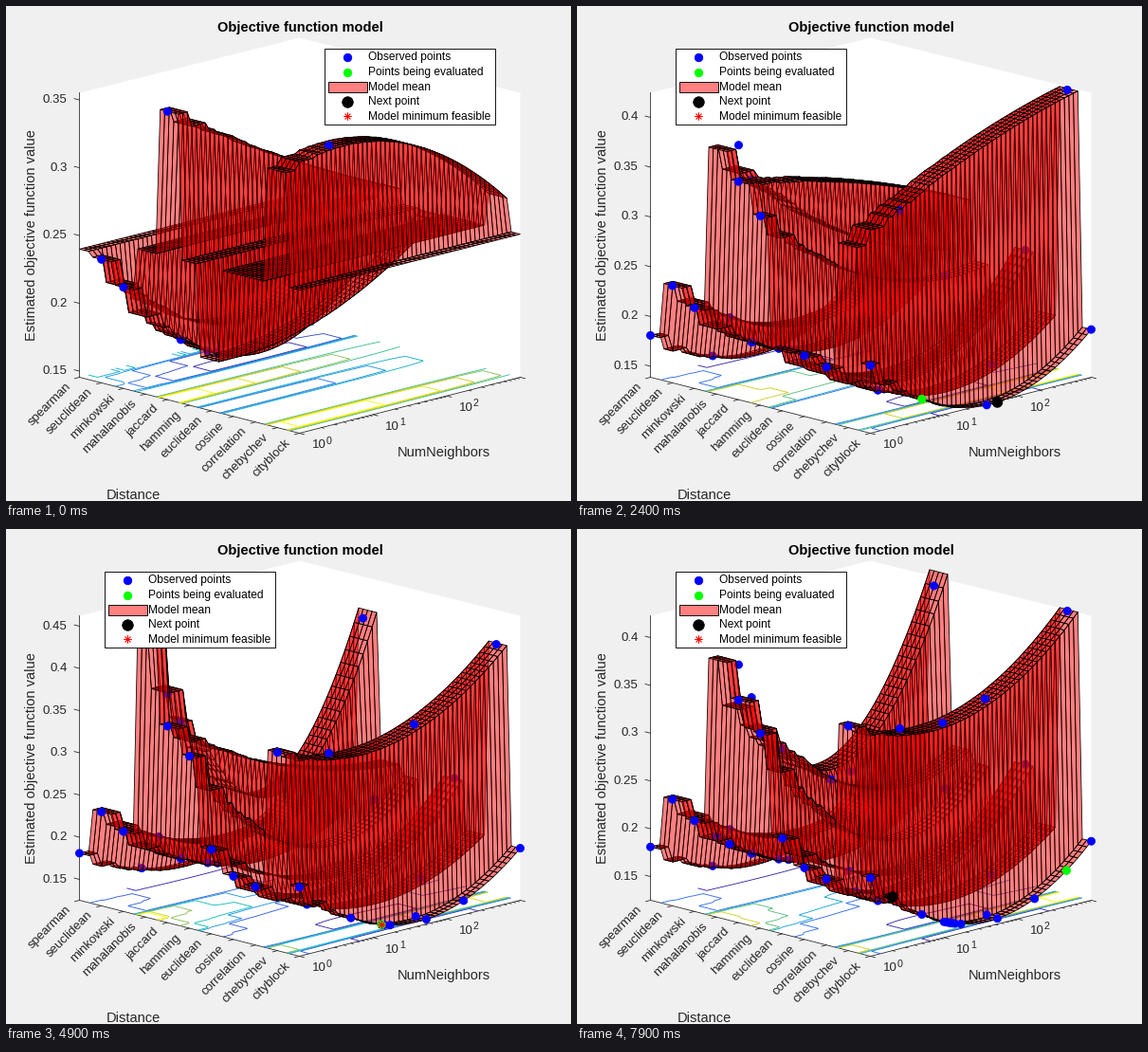
These frames come from a looping animation (596x522 px, 8 s). A matplotlib script:

```python
import numpy as np
import matplotlib.pyplot as plt
from matplotlib.animation import FuncAnimation
from matplotlib.collections import PolyCollection
from matplotlib.colors import LinearSegmentedColormap
from matplotlib.patches import Polygon, Rectangle

W, H, DPI = 596, 522, 128
PX = 72 / DPI
FRAMES, INTERVAL = 80, 100
INK = "#262626"
BLUE, GREEN, BLACK, GLASS = (0, 0, 1, 1), (0, 1, 0, 1), (0, 0, 0, 1), (1, 0, 0, .5)
NAMES = ("spearman seuclidean minkowski mahalanobis jaccard hamming euclidean "
         "cosine correlation chebychev cityblock").split()

plt.rcParams["font.family"] = "Liberation Sans"
parula = LinearSegmentedColormap.from_list(
    "parula", ["#3e26a8", "#2f80fa", "#12beb9", "#c8c129", "#f9fb15"])

# Model stages: mean at the start, middle and end of the neighbor axis.
stage_at, stages, z_low, z_scale = [], [], [], []


def stage(frame, low, scale, **curves):
    model = stages[-1].copy() if stages else np.full((11, 3), .251)
    for name, values in curves.items():
        model[NAMES.index(name)] = values
    stage_at.append(frame)
    stages.append(model)
    z_low.append(low)
    z_scale.append(scale)


stage(0, .1455, 1430, spearman=.24, seuclidean=(.2365, .17, .2),
      minkowski=(.22, .151, .19), jaccard=(.358, .305, .262),
      euclidean=(.183, .198, .25), chebychev=(.335, .337, .275))
stage(14, .1376, 1048, spearman=(.181, .14, .207),
      mahalanobis=(.385, .363, .307), jaccard=(.358, .331, .286),
      hamming=(.329, .24, .226), euclidean=(.199, .15, .197), cosine=.267,
      correlation=(.194, .143, .192), chebychev=(.322, .384, .423),
      cityblock=.267)
stage(24, .139, 1050, mahalanobis=(.385, .28, .23),
      cosine=(.2, .155, .25), cityblock=(.207, .138, .187))
stage(36, .1305, 1024, mahalanobis=(.377, .342, .418),
      cityblock=(.207, .131, .187))
stage(49, .1253, 890, mahalanobis=(.47, .237, .423),
      jaccard=(.358, .28, .25), hamming=(.329, .19, .238),
      euclidean=(.225, .16, .2), chebychev=(.36, .342, .423))
stage(61, .1245, 980, mahalanobis=(.44, .25, .428),
      jaccard=(.358, .24, .25))
stage(79, .1252, 1008, mahalanobis=(.394, .255, .428))
stages = np.array(stages)

# Observations per distance: (first frame shown, neighbors).
OBSERVED = dict(
    spearman=[(5, 1), (9, 7)],
    seuclidean=[(0, 1), (18, 6)],
    minkowski=[(0, 1), (0, 6), (0, 14), (0, 19), (55, 2), (58, 3)],
    mahalanobis=[(10, 2), (15, 3), (32, 900), (37, 67)],
    jaccard=[(0, 1), (57, 18), (73, 4)],
    hamming=[(8, 1), (22, 324)],
    euclidean=[(38, 1), (54, 8)],
    cosine=[(19, 1), (21, 999), (68, 5)],
    correlation=[(6, 1), (11, 5), (13, 175)],
    chebychev=[(0, 5), (12, 940), (37, 1), (43, 72), (66, 19)],
    cityblock=[(17, 1), (23, 38), (24, 999), (25, 5), (26, 53), (33, 17),
               (45, 170), (80, 460), (81, 2)]
    + [(47 + 3 * k, 14 - k) for k in range(5)])

GRID = 50
cats = np.linspace(0, 10, GRID)
cat_id = np.round(cats).astype(int)
logs = np.linspace(0, 1, GRID)
CC, TT = np.meshgrid(cats, logs, indexing="ij")


def basis(t):
    """Weights of the parabola through start, middle and end."""
    return np.array([(2 * t - 1) * (t - 1), 4 * t * (1 - t), t * (2 * t - 1)])


# Neighbors are whole numbers, so the low end forms stairs.
grid_basis = basis(np.log10(np.round(10 ** (3 * logs))) / 3)


def floor_xy(c, t):
    return 77 + 23.2 * c + 233 * t, 391 + 5.9 * c - 59 * t


def state(frame):
    k = min(np.searchsorted(stage_at, frame, side="right") - 1, len(stages) - 2)
    u = (frame - stage_at[k]) / (stage_at[k + 1] - stage_at[k])
    mix = lambda a: a[k] * (1 - u) + a[k + 1] * u
    return mix(stages), mix(z_low), mix(z_scale)


fig = plt.figure(figsize=(W / DPI, H / DPI), dpi=DPI, facecolor="#f0f0f0")
ax = fig.add_axes([0, 0, 1, 1])
ax.set_xlim(-.5, W - .5)
ax.set_ylim(H - .5, -.5)
ax.set_autoscale_on(False)
ax.axis("off")


def text(x, y, s, size=13.33, **kw):
    kw = {"color": INK, "va": "center", **kw}
    return ax.text(x, y, s, fontsize=size * PX, **kw)


def line(xs, ys):
    return ax.plot(xs, ys, color=INK, lw=.8 * PX, zorder=1)[0]


# Box, axes and fixed labels
ax.add_patch(Polygon([(77, 91), (309, 33), (542, 91), (542, 391), (309, 450),
                      (77, 391)], fc="white", ec="none", zorder=0))
line([77, 77, 309, 542], [91, 391, 450, 391])
text(309.5, 22, "Objective function model", 14.67, weight="bold",
     color="black", ha="center")
text(27, 241, "Estimated objective function value", 14.67, rotation=90,
     ha="center")
text(133.5, 516, "Distance", 14.67, ha="center")
text(461, 470, "NumNeighbors", 14.67, ha="center")
for c, name in enumerate(NAMES):
    x, y = floor_xy(c, 0)
    line([x, x - 5], [y, y + 1.3])
    text(x - 11, y + 8, name, rotation=45, ha="right", rotation_mode="anchor")
for p in range(4):
    for m in range(1, 10 if p < 3 else 2):
        x, y = floor_xy(10, (p + np.log10(m)) / 3)
        size = 1 if m == 1 else .5
        line([x, x + 5 * size], [y, y + 1.3 * size])
        if m == 1 and p < 3:
            text(x + 13, y + 13, "10")
            text(x + 28, y + 8, str(p), 10.67)

z_ticks = [(line([0, 0], [0, 0]), text(64, 0, "", ha="right"))
           for _ in range(8)]


def mark(x, y, marker, color, size, z):
    return ax.plot([x], [y], marker=marker, color=color, ms=size * PX, ls="",
                   mew=.8 * PX, zorder=z)[0]


STAR = (8, 2, 0)


def legend(x):
    box = dict(ec="black", lw=.9 * PX)
    items = [ax.add_patch(Rectangle((x, 44), 180, 80, fc="white", zorder=10,
                                    **box)),
             ax.add_patch(Rectangle((x + 4, 79.5), 41, 11, fc=(1, .5, .5),
                                    zorder=11, **box))]
    rows = [("Observed points", "o", "blue", 8.5),
            ("Points being evaluated", "o", "lime", 8.5),
            ("Model mean", None, None, 0),
            ("Next point", "o", "black", 11.5),
            ("Model minimum feasible", STAR, "red", 8)]
    for i, (label, marker, color, size) in enumerate(rows):
        y = 53.5 + 15.6 * i
        items.append(text(x + 47, y + .5, label, 12, color="black", zorder=11))
        if marker:
            items.append(mark(x + 24, y, marker, color, size, 11))
    return items


legend_right, legend_left = legend(335), legend(103)

surface = ax.add_collection(PolyCollection([], lw=.8 * PX, zorder=3))
best = mark(0, 0, STAR, "red", 9, 4)
contours = []

ci, tj = np.meshgrid(np.arange(GRID - 1), np.arange(GRID - 1), indexing="ij")
quad_depth = (tj - ci).ravel()
ring = np.linspace(0, 2 * np.pi, 16, endpoint=False)
disc = np.column_stack([np.cos(ring), np.sin(ring)])


def dots(frame, model):
    """Yield each marker: distance, log position, value, colour, radius."""
    for c, name in enumerate(NAMES):
        for born, n in OBSERVED[name]:
            t = np.log10(n) / 3
            wait = born - frame
            if wait <= 0:
                # An observed value is what the next stage fits.
                k = min(np.searchsorted(stage_at, born), len(stages) - 1)
                yield c, t, stages[k, c] @ basis(t), BLUE, 4.1
            elif wait <= 2:
                color, r = (GREEN, 4.3) if wait == 1 else (BLACK, 5.5)
                yield c, t, model[c] @ basis(t), color, r


def draw_ticks(low, scale):
    values = np.arange(np.ceil(low / .05), 20) * .05
    for (tick, label), v in zip(z_ticks, values):
        y = 391 - (v - low) * scale
        tick.set_data([77, 71.5], [y, y - 1.4])
        label.set_position((64, y))
        label.set_text(f"{v:.2f}".rstrip("0"))
        tick.set_visible(y >= 91)
        label.set_visible(y >= 91)


def draw_contours(z):
    while contours:
        contours.pop().remove()
    step = .02 if np.ptp(z) < .22 else .05
    levels = np.arange(np.ceil(z.min() / step), np.floor(z.max() / step) + 1)
    contours.append(ax.contour(*floor_xy(CC, TT), z, levels=levels * step,
                               cmap=parula, linewidths=.9 * PX, zorder=2))


def draw_surface(frame, model, z, low, scale):
    x, y = floor_xy(CC, TT)
    p = np.stack([x, y - (z - low) * scale], axis=-1)
    quads = np.stack([p[:-1, :-1], p[1:, :-1], p[1:, 1:], p[:-1, 1:]], axis=2)
    polys = list(quads.reshape(-1, 4, 2))
    faces = [GLASS] * len(polys)
    edges = [BLACK] * len(polys)
    depth = list(quad_depth)
    for c, t, v, color, r in dots(frame, model):
        px, py = floor_xy(c, t)
        polys.append(disc * r + (px, py - (v - low) * scale))
        faces.append(color)
        edges.append(color)
        depth.append((GRID - 1) * (t - c / 10) - 3)
    order = np.argsort(-np.array(depth), kind="stable")
    surface.set_verts([polys[i] for i in order])
    surface.set_facecolor([faces[i] for i in order])
    surface.set_edgecolor([edges[i] for i in order])


def update(frame):
    model, low, scale = state(frame)
    z = (model @ grid_basis)[cat_id]
    draw_ticks(low, scale)
    draw_contours(z)
    draw_surface(frame, model, z, low, scale)
    t = np.log10(13) / 3
    bx, by = floor_xy(10, t)
    best.set_data([bx], [by - (model[10] @ basis(t) - low) * scale])
    best.set_visible(40 <= frame < 70)
    for item in legend_right:
        item.set_visible(frame < 11)
    for item in legend_left:
        item.set_visible(frame >= 11)
    return []


anim = FuncAnimation(fig, update, frames=FRAMES, interval=INTERVAL,
                     init_func=lambda: [], repeat=True, repeat_delay=0,
                     blit=False)
plt.show()
```
